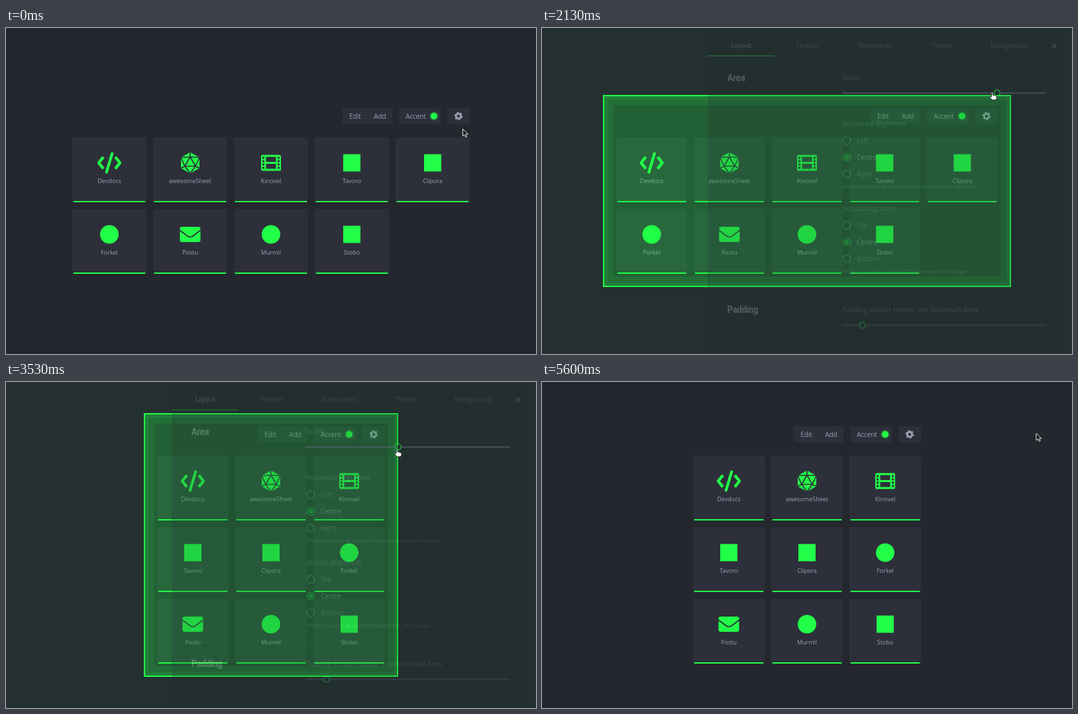
Animation of 800 by 492 pixels, one loop 5.67 s. Source, as an HTML page:

```html
<!DOCTYPE html>
<html lang="en">
<head>
<meta charset="utf-8">
<title>Bookmark layout settings</title>
<style>
  :root { --accent: #22ff48; --tile: #2d303a; --text: #9aa0b4; --panel: #24272f; }
  html, body { margin: 0; width: 100%; height: 100%; overflow: hidden; background: #25272f; }
  svg { display: block; width: 100vw; height: 100vh; }
  text { font: 9.87px "Open Sans", sans-serif; fill: var(--text); }
  .mid { text-anchor: middle; }
  .label { font-size: 9px; }
  .note { font-size: 7.87px; }
  .on { fill: #fff; }
  .heading {
    font: 700 15.5px "Roboto Condensed", Roboto, sans-serif;
    font-stretch: 75%; letter-spacing: -.6px; fill: #fff;
  }
  .box { fill: var(--tile); }
  .accent { fill: var(--accent); }
  .line { fill: none; stroke: var(--accent); }
  .cut { fill: none; stroke: var(--tile); stroke-width: 1.7; }
  .hole { fill: var(--tile); }
  .gear { fill: none; stroke: var(--text); }
</style>
</head>
<body>
<svg id="stage" viewBox="0 0 800 492" preserveAspectRatio="none"></svg>
<script>
const LOOP = 5670, FRAMES = 85, STEP = LOOP / FRAMES;
const stage = document.getElementById("stage");

// Markup helpers
const text = (x, y, s, cls = "") => `<text x="${x}" y="${y}" class="${cls}">${s}</text>`;
const rect = (x, y, w, h, cls, r = 0, attrs = "") =>
  `<rect x="${x}" y="${y}" width="${w}" height="${h}" rx="${r}" class="${cls}" ${attrs}/>`;
const circle = (x, y, r, attrs) => `<circle cx="${x}" cy="${y}" r="${r}" ${attrs}/>`;
const path = (d, attrs) => `<path d="${d}" ${attrs}/>`;
const group = (id, content) => `<g id="${id}">${content}</g>`;

const disc = circle(0, 0, 14, 'class="accent"');
const square = rect(-13, -13, 26, 26, "accent");
const code =
  path("M-9-8.8L-16 0L-9 8.8M9-8.8L16 0L9 8.8", 'class="line" stroke-width="4.4" stroke-linejoin="round"') +
  path("M4.2-14L-4.2 14", 'class="line" stroke-width="4.2" stroke-linecap="round"');
const dice =
  path("M0-16L14-8V8L0 16L-14 8V-8Z", 'class="accent"') +
  path("M0-9L-8 5H8ZM0-16V-9M-14-8L0-9L14-8M-14-8L-8 5L-14 8M14-8L8 5L14 8M-8 5L0 16L8 5", 'class="cut"');
const film = rect(-15, -12, 30, 24, "accent", 2) +
  rect(-7.5, -9, 15, 7.5, "hole") + rect(-7.5, 1.5, 15, 7.5, "hole") +
  [-9, -4, 1, 6].map(y => rect(-13, y, 3, 3, "hole") + rect(10, y, 3, 3, "hole")).join("");
const mail = rect(-15.5, -11.5, 31, 23, "accent", 3) +
  path("M-16-6.5L-4 2.5Q0 5.5 4 2.5L16-6.5", 'class="cut"');

const bookmarks = [
  ["Devdocs", code], ["awesomeSheet", dice], ["Kinovel", film],
  ["Tavoro", square], ["Clipora", square], ["Forkel", disc],
  ["Postu", mail], ["Murmil", disc], ["Stobo", square]
];

// Header, positioned from its right edge
const header = rect(-192, 0, 75, 24, "box", 2) + rect(-107, 0, 63, 24, "box", 2) + rect(-34, 0, 34, 24, "box", 2) +
  text(-173, 15.5, "Edit", "mid") + text(-135.5, 15.5, "Add", "mid") + text(-81.5, 15.5, "Accent", "mid") +
  circle(-54, 12, 7, 'class="accent" opacity=".2"') + circle(-54, 12, 5, 'class="accent"') +
  circle(-17, 12, 3.6, 'class="gear" stroke-width="2.8"') +
  circle(-17, 12, 5.3, 'class="gear" stroke-width="2" pathLength="12" stroke-dasharray="1.1 .9"');

const tile = ([name, icon]) => `<g class="tile"><rect class="box" height="98" rx="2"/>
  <rect class="accent" x="1.5" y="96" height="2" rx="1"/>
  <g><g transform="translate(0 38.5)">${icon}</g>${text(0, 69, name, "mid label")}</g></g>`;

// Settings panel
const radio = (y, name, on) =>
  circle(460, y, 5.7, `fill="none" stroke="${on ? "var(--accent)" : "#8a90a4"}" stroke-width="1.6"`) +
  (on ? circle(460, y, 3.4, 'class="accent"') : "") + text(475, y + 3.6, name, on ? "on" : "");
const radios = (y, names) => names.map((n, i) => radio(y + i * 25.2, n, i === 1)).join("");
const track = y => rect(453, y - 1, 307.5, 2.2, "", 1, 'fill="#6b7084"');
const thumb = (x, y) => circle(x, y, 4.4, 'class="line" style="fill:var(--panel)" stroke-width="2"');
const divider = (x, y, color) => path(`M${x} ${y}H760.5`, `stroke="${color}"`);

const menu = rect(250, 10, 540, 472, "", 3, 'fill="var(--panel)" opacity=".965"') +
  ["Layout", "Header", "Bookmarks", "Theme", "Background"]
    .map((s, i) => text(300.5 + i * 101.1, 30.3, s, i ? "mid" : "mid on")).join("") +
  rect(250, 41, 101, 2, "accent") +
  path("M769 23l7.6 7.6M776.6 23l-7.6 7.6", 'stroke="#b4b9c8" stroke-width="1.6"') +
  text(279.5, 79.5, "Area", "heading") + text(453, 78.8, "Width") +
  divider(453, 127.5, "#2f323c") +
  text(453, 148.3, "Horizontal Alignment") + radios(170, ["Left", "Centre", "Right"]) +
  text(453, 241.5, "Effects may not be visible if the Layout Area is full width.", "note") +
  divider(453, 255.5, "#2f323c") +
  text(453, 276.2, "Vertical Alignment") + radios(297.8, ["Top", "Centre", "Bottom"]) +
  text(453, 369.5, "Effects may not be visible if Bookmarks fill the page.", "note") +
  divider(279.5, 393, "#424551") +
  text(279.5, 430, "Padding", "heading") + text(453, 429.2, "Padding outside Header and Bookmark Area") +
  track(448.5) + thumb(483.7, 448.5);

const arrow = path("M0 0V10.6L2.5 8.4L4.2 12.2L6.1 11.4L4.5 7.7H7.8Z", 'fill="#16171b" stroke="#fff" stroke-width=".9"');
const hand = path("M-1 1Q0-.8 1.1 1V4.3Q2.4 3.6 3.3 4.7Q4.6 4.2 5.3 5.3Q7 5 7 6.8V8.6L5.8 11.4H0L-3.4 7Q-3.4 5.2-1 6.6Z",
  'fill="#fff" stroke="#16171b" stroke-width=".9"');

stage.innerHTML = group("header", header) + group("tiles", bookmarks.map(tile).join("")) +
  group("edge", `<rect class="accent" opacity=".23"/><rect class="line" opacity=".1" stroke-width="16"/>
    <rect class="line" opacity=".1" stroke-width="7"/><rect class="line" stroke-width="2"/>`) +
  group("shade", rect(0, 0, 800, 492, "accent")) +
  group("menu", menu) + group("slider", track(98) + group("knob", thumb(0, 98))) +
  group("arrow", arrow) + group("hand", hand);

const $ = id => document.getElementById(id);
const move = (el, x, y) => el.setAttribute("transform", `translate(${x} ${y})`);
const set = (el, values) => { for (const k in values) el.setAttribute(k, values[k]); };
const tiles = [...document.querySelectorAll(".tile")];
const bands = [...$("edge").children];

const linear = u => u, smooth = u => u * u * (3 - 2 * u);

// Value at time t along [time, value] keys
function along(t, keys, ease = smooth) {
  const i = keys.findIndex(k => k[0] > t);
  if (i === 0) return keys[0][1];
  if (i < 0) return keys[keys.length - 1][1];
  const [t0, a] = keys[i - 1], [t1, b] = keys[i];
  return a + (b - a) * ease((t - t0) / (t1 - t0));
}

const widthKeys = [[1950, 80], [2400, 72], [3000, 61], [3067, 55], [3270, 48]];
const cursorKeys = [
  [0, 689.5, 152.5], [400, 685, 138], [700, 685, 138], [867, 686, 139], [1250, 687, 139],
  [1670, 695, 96], [1950, 695, 96], [2400, 657, 99], [3000, 620, 99], [3067, 606, 99],
  [3270, 590, 101], [4000, 590, 102], [4133, 636, 105.5], [4200, 650, 100], [4700, 772, 27],
  [4900, 772, 27], [5390, 746, 77.5]
];
const between = (t, a, b) => t >= a && t < b;

function drawLayout(percent) {
  const outer = percent * 8, left = 400 - outer / 2, inner = outer - 40;
  const columns = Math.floor((inner + 10) / 110), rows = Math.ceil(bookmarks.length / columns);
  const width = (inner - (columns - 1) * 10) / columns;
  const height = 34 + rows * 108, top = 246 - height / 2;
  move($("header"), left + 20 + inner, top);
  tiles.forEach((el, i) => {
    const [box, bar, face] = el.children;
    move(el, left + 20 + (i % columns) * (width + 10), top + 44 + Math.floor(i / columns) * 108);
    set(box, { width });
    set(bar, { width: width - 3 });
    move(face, width / 2, 0);
  });
  bands.forEach((el, i) => {
    const inset = [0, 8, 3.5, 1][i];
    set(el, { x: left + inset, y: top - 20 + inset, width: outer - 2 * inset, height: height + 40 - 2 * inset });
  });
}

function draw(t) {
  const percent = Math.round(along(t, widthKeys, linear));
  drawLayout(percent);
  set($("edge"), { opacity: along(t, [[1940, 0], [2100, 1], [4040, 1], [4230, 0]]) });
  set($("shade"), { opacity: along(t, [[700, 0], [860, .4], [1940, .4], [2100, .045], [4230, .045],
    [4450, .4], [4830, .4], [5030, 0]]) });

  const y = along(t, [[737, -492], [1005, 0], [4830, 0], [5090, -492]]);
  const fade = low => along(t, [[1940, 1], [2100, low], [4230, low], [4450, 1]]);
  set($("menu"), { opacity: fade(.2) });
  set($("slider"), { opacity: fade(.45) });
  move($("menu"), 0, y);
  move($("slider"), 0, y);
  move($("knob"), 592 + (percent - 48) * 3.27, 0);

  const [cx, cy] = [1, 2].map(i => along(t, cursorKeys.map(k => [k[0], k[i]]), linear));
  const pointing = between(t, 260, 800) || between(t, 1640, 4240) || between(t, 4640, 4860);
  move($("arrow"), cx, cy);
  move($("hand"), cx, cy);
  set($("arrow"), { opacity: pointing ? 0 : 1 });
  set($("hand"), { opacity: pointing ? 1 : 0 });
}

// The picture advances in even steps; 8 ms absorbs rounding of the step times
function frame(now) {
  draw(Math.floor((now % LOOP + 8) / STEP) % FRAMES * STEP);
  requestAnimationFrame(frame);
}
draw(0);
requestAnimationFrame(frame);
</script>
</body>
</html>
```
